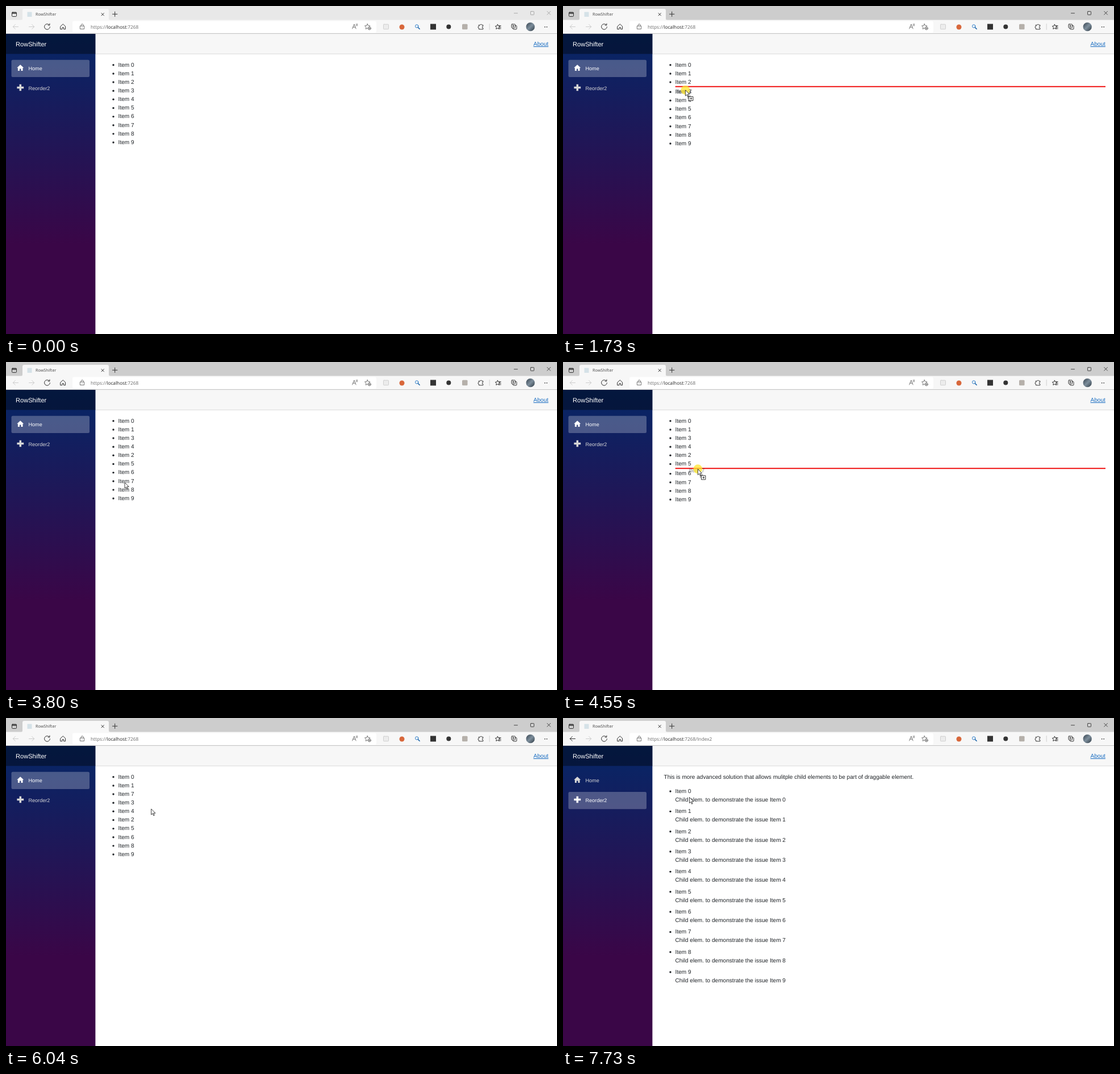
These frames come from a looping animation (970x577 px, 8 s). An HTML page:

```html
<!DOCTYPE html>
<html lang="en">
<head>
<meta charset="utf-8">
<title>RowShifter</title>
<style>
  html, body { margin: 0; width: 100%; height: 100%; overflow: hidden; background: #fff; }
  svg { display: block; width: 100vw; height: 100vh; text-rendering: geometricPrecision; }
  .page { font: 10.08px "Liberation Sans", Arial, sans-serif; fill: #212529; }
  .nav { font: 9.07px "Liberation Sans", Arial, sans-serif; fill: #d7d7d7; }
  .ui { font: 8.3px "Open Sans", "Noto Sans", sans-serif; fill: #6b6b6b; }
  .icon { fill: none; stroke: #333; stroke-linecap: round; stroke-linejoin: round; }
  .thin { stroke: #555; stroke-width: .8; }
</style>
</head>
<body>
<svg viewBox="0 0 970 577">
  <defs>
    <linearGradient id="side" x1="0" y1="0" x2="0" y2="1">
      <stop offset="0" stop-color="#052767"/><stop offset=".7" stop-color="#3a0647"/>
    </linearGradient>
    <linearGradient id="photo" x1="0" y1="0" x2="1" y2="1">
      <stop offset="0" stop-color="#36434e"/><stop offset=".5" stop-color="#7d8e9c"/><stop offset="1" stop-color="#2d3942"/>
    </linearGradient>
  </defs>
  <rect width="970" height="577" fill="#fff"/>

  <!-- browser frame -->
  <rect id="strip" width="970" height="25"/>
  <rect y="24.5" width="970" height="24" fill="#f7f7f7"/>
  <path d="M26 25q3 0 3-3V8q0-3 3-3H178q3 0 3 3V22q0 3 3 3z" fill="#f7f7f7"/>
  <rect x="117" y="26.5" width="535" height="20.5" rx="3" fill="#fff"/>
  <rect y="48" width="970" height="1" fill="#c4c4c4"/>
  <rect x="37.5" y="10.5" width="8" height="8.5" fill="#d5e2e8"/>
  <text class="ui" x="52" y="17.2" style="font-size:7.2px;fill:#444">RowShifter</text>
  <text class="ui" x="149" y="39.8">https://<tspan fill="#222">localhost</tspan>:7268<tspan id="path"></tspan></text>
  <g class="icon">
    <rect x="10.5" y="11" width="8" height="7.5" rx="1.2"/><path d="M11 12.4h7" stroke-width="2"/>
    <path d="M168 12.5l4.4 4.4m0-4.4l-4.4 4.4M187.5 14.3h8.4m-4.2-4.2v8.4"/>
    <path id="back" d="M21.5 36.5h-9.2m4-4l-4 4l4 4"/>
    <path d="M40.5 36.5h9.2m-4-4l4 4l-4 4" stroke="#cdcdcd"/>
    <path d="M76.2 33.2A4.9 4.9 0 1 0 77.4 36.7M76.9 31v2.8h-2.9"/>
    <path d="M96 35.8l4.3-4l4.3 4v5h-3v-3h-2.6v3h-3z"/>
    <path class="thin" d="M130.8 35h6.8v5.5h-6.8zm1.5 0v-1.4a1.9 1.9 0 0 1 3.8 0V35M134.2 37.5v.2"/>
    <path class="thin" d="M609.7 40l3.2-8l3.2 8m-5.2-2.8h4M616.4 32q1 1 0 2.4M618 31q1.5 2 0 4.2"/>
    <path class="thin" id="addStar"/>
    <circle class="thin" cx="639.8" cy="39.3" r="2.6" fill="#fff"/><path class="thin" d="M638.5 39.3h2.6m-1.3-1.3v2.6"/>
    <rect x="664.5" y="32.2" width="9" height="8.6" rx="1" fill="#ececec" stroke="#cfcfcf"/>
    <circle cx="723.2" cy="35.5" r="2.7" stroke="#2679c8"/><path d="M725.3 37.6l2.8 2.8" stroke="#2469ac" stroke-width="1.5"/>
    <path d="M832.5 33.5h2.2a1.6 1.6 0 0 1 3.1 0h2v2.2a1.5 1.5 0 0 0 0 3v2.2h-7.3v-2.2a1.5 1.5 0 0 1 0-3z"/>
    <path d="M851.2 31.5v10" stroke="#cfcfcf"/>
    <path id="listStar"/><path d="M868 34.7h3.2m-3.2 2.6h3.2m-3.2 2.5h3.2"/>
    <rect x="892.5" y="34.5" width="6.5" height="6.5" rx="1"/><rect x="890" y="32" width="6.5" height="6.5" rx="1" fill="#f7f7f7"/>
    <path d="M891.7 35.2h3m-1.5-1.5v3"/>
    <path d="M948.7 36.8h7" stroke-width="1.8" stroke-dasharray="0 3.5"/>
  </g>
  <circle cx="697" cy="37" r="4.5" fill="#d8673b"/>
  <rect x="747" y="31.5" width="10" height="10" fill="#333"/>
  <circle cx="779.3" cy="36.5" r="4" fill="#333"/>
  <rect x="803" y="31.7" width="9.5" height="9.5" rx="1.5" fill="#b5b0aa"/>
  <circle cx="923.2" cy="36.7" r="7.6" fill="url(#photo)"/>
  <g id="controls" class="icon" stroke-width=".8">
    <path d="M894.5 12.7h6M952.7 9.4l5.8 5.8m0-5.8l-5.8 5.8"/><rect x="923.5" y="9.5" width="6" height="6" rx=".8"/>
  </g>

  <!-- site frame -->
  <rect x="157" y="49" width="813" height="35" fill="#f7f7f7"/>
  <rect x="157" y="83.8" width="813" height=".8" fill="#d0d0d0"/>
  <text class="page" x="928.5" y="70" style="fill:#1b6ec2" text-decoration="underline">About</text>
  <rect y="49" width="157.4" height="528" fill="url(#side)"/>
  <rect y="49" width="157.4" height="35.3" fill="#000" fill-opacity=".4"/>
  <text class="nav" x="17" y="70.6" style="font-size:11.1px;fill:#fff">RowShifter</text>
  <rect id="homeBox" x="9.5" y="94.7" width="137.5" height="30.3" rx="2.5" fill="#fff"/>
  <rect id="orderBox" x="9.5" y="130" width="137.5" height="30.3" rx="2.5" fill="#fff"/>
  <g id="homeNav" class="nav"><path d="M25.2 103.2l-6 5.6h1.7v5.2h3v-3.4h2.6v3.4h3v-5.2h1.7z"/><text x="39.5" y="112.9">Home</text></g>
  <g id="orderNav" class="nav"><path d="M19.4 143.5h11.8m-5.9-5.8v11.6" stroke-width="3.5"/><text x="39.5" y="148.2">Reorder2</text></g>

  <!-- content -->
  <g id="simple" class="page"></g>
  <g id="nested" class="page"></g>
  <rect id="marker" x="197.7" width="757.3" height="2" fill="#f01414"/>
  <g id="status">
    <path d="M0 562.5H101q3 0 3 3V577H0z" fill="#f7f7f7" stroke="#c8c8c8" stroke-width=".6"/>
    <text class="ui" x="4" y="572.5" style="font-size:7px">https://localhost:7268/Index2</text>
  </g>
  <text id="ghost" class="page" opacity=".5"></text>
  <g id="pointer">
    <circle id="halo" r="8" fill="#ffe62e"/>
    <path id="arrow" d="M0 0V10.2L2.4 8L4.1 11.8L5.7 11.1L4 7.4H7.3z" fill="#fff" stroke="#111" stroke-width=".8" stroke-linejoin="round"/>
    <path id="hand" d="M-1.3 6.8V.4q1-1.4 2 0V4.4l3.1.7q1.4.5 1.3 2l-.7 5.6H-.7L-3.6 8.4q.4-1.9 2.3 0z" fill="#fff" stroke="#333" stroke-width=".6" stroke-linejoin="round"/>
    <g id="copy" class="icon"><rect x="6.5" y="11.5" width="7" height="7" fill="#fff"/><path d="M8.5 15h3m-1.5-1.5v3"/><path d="M4.5 14.5v-4.2h4.2" stroke-dasharray="1 1.4"/></g>
  </g>
</svg>
<script>
  const LOOP = 8000, ROW = 15.13, TOP = 95.6, LEFT = 197.6, BASE = 106.7;
  const FOCUS = 1270, CLICK = 7040;
  const $ = Object.fromEntries([...document.querySelectorAll('[id]')].map(e => [e.id, e]));

  const easeOut = p => 1 - (1 - p) ** 1.5;
  const rush = p => 1 - (1 - p) ** 2.4;
  const linger = p => p ** 1.66;

  // pointer strokes; x and y may ease differently, which bends the stroke
  const home = { x: 844, y: 495 };
  const strokes = [
    { from: 190, to: 930, x: 217, y: 129, easeX: rush, easeY: rush },
    { from: 1000, to: 1070, x: 214, y: 130 },
    { from: 1460, to: 2220, x: 217, y: 167 },
    { from: 2220, to: 2420, x: 213, y: 175.5 },
    { from: 2880, to: 3200, x: 214, y: 143 },
    { from: 3200, to: 3670, x: 196, y: 218 },
    { from: 3740, to: 3800, x: 209, y: 212 },
    { from: 4070, to: 5080, x: 245, y: 131, easeX: rush, easeY: linger },
    { from: 5480, to: 5900, x: 256.5, y: 160 },
    { from: 6040, to: 6370, x: 72, y: 145 },
    { from: 7250, to: 7730, x: 222.5, y: 139.5 }
  ];
  const grabs = [
    { item: 2, press: FOCUS, lift: 1460, drop: 2270, slot: 4 },
    { item: 5, press: 2880, lift: 2930, drop: 3350, slot: 5 },
    { item: 7, press: 4070, lift: 4130, drop: 5480, slot: 2 }
  ];
  const items = [...Array(10).keys()];

  const within = (t, from, to) => t >= from && t < to;
  const show = (el, on) => { el.style.display = on ? '' : 'none'; };
  const place = (el, x, y) => el.setAttribute('transform', `translate(${x} ${y})`);
  const progress = (t, from, to) => Math.min(1, Math.max(0, (t - from) / (to - from)));
  const mix = (a, b, p) => a + (b - a) * p;
  const label = (x, y, text) => `<text x="${x}" y="${y}">${text}</text>`;
  const bullet = y => `<circle cx="189" cy="${y - 2.9}" r="1.7"/>`;

  function starPath(cx, cy, r) {
    const points = items.map(i => {
      const a = i * Math.PI / 5, d = i % 2 ? r / 2 : r;
      return `${cx + d * Math.sin(a)} ${cy - d * Math.cos(a)}`;
    });
    return `M${points.join('L')}z`;
  }

  function pointerAt(t) {
    return strokes.filter(s => s.from <= t).reduce((at, s) => {
      const p = progress(t, s.from, s.to);
      return {
        x: mix(at.x, s.x, (s.easeX || easeOut)(p)),
        y: mix(at.y, s.y, (s.easeY || easeOut)(p))
      };
    }, home);
  }

  function orderAt(t) {
    const order = [...items];
    for (const g of grabs.filter(g => g.drop <= t)) {
      order.splice(order.indexOf(g.item), 1);
      order.splice(g.slot, 0, g.item);
    }
    return order;
  }

  $.addStar.setAttribute('d', starPath(636.3, 36.5, 5));
  $.listStar.setAttribute('d', starPath(865.5, 36.8, 4.5));
  $.simple.innerHTML = items.map(() => `<g>${bullet(BASE)}${label(LEFT, BASE, '')}</g>`).join('');
  $.nested.innerHTML =
    label(177.5, BASE, 'This is more advanced solution that allows mulitple child elements to be part of draggable element.') +
    items.map(n => {
      const y = 131.9 + 35.34 * n;
      return bullet(y) + label(LEFT, y, 'Item ' + n) +
        label(LEFT, y + ROW, 'Child elem. to demonstrate the issue Item ' + n);
    }).join('');

  function drawList(t, x, y) {
    const drag = grabs.find(g => within(t, g.lift, g.drop));
    const slot = drag ? Math.floor((y - TOP) / ROW) : items.length;
    const order = orderAt(t);
    [...$.simple.children].forEach((row, i) => {
      place(row, 0, i * ROW + (i >= slot ? 2 : 0));
      row.lastChild.textContent = 'Item ' + order[i];
    });
    for (const el of [$.marker, $.ghost, $.copy]) show(el, drag);
    if (!drag) return;
    $.marker.setAttribute('y', TOP + slot * ROW - .2);
    $.ghost.textContent = 'Item ' + drag.item;
    place($.ghost, x - 16, y + 5.2);
  }

  function draw(t) {
    const { x, y } = pointerAt(t);
    const second = t >= CLICK;
    const hover = t > 6040 && x < 147;
    const held = grabs.find(g => within(t, g.press, g.drop));
    const switched = progress(t, CLICK + 70, CLICK + 280);

    drawList(t, x, y);
    show($.simple, !second);
    show($.nested, second);

    show($.pointer, t >= 190);
    place($.pointer, x, y);
    show($.hand, hover);
    show($.arrow, !hover);
    show($.halo, held || within(t, CLICK, CLICK + 100));
    $.halo.style.opacity = held ? mix(.55, .75, progress(t, held.press, held.press + 150)) : .7;

    show($.status, within(t, 6510, CLICK + 60));
    $.status.style.opacity = progress(t, 6400, 6650);

    $.homeBox.style.opacity = mix(.25, 0, switched ** 2);
    $.orderBox.style.opacity = second ? mix(.1, .25, switched ** 2) : hover ? .1 : 0;
    $.homeNav.style.fill = switched < 1 ? '#fff' : '#d7d7d7';
    $.orderNav.style.fill = $.orderNav.style.stroke = '';
    $.orderNav.style.fill = second || hover ? '#fff' : '#d7d7d7';
    $.orderNav.firstChild.style.stroke = $.orderNav.style.fill;
    $.path.textContent = second ? '/Index2' : '';
    $.back.style.stroke = second ? '#333' : '#cdcdcd';
    $.strip.style.fill = t < FOCUS ? '#e8e8e8' : '#cdcdcd';
    $.controls.style.stroke = t < FOCUS ? '#999' : '#222';
  }

  const start = performance.now();
  (function tick() {
    draw((performance.now() - start) % LOOP);
    requestAnimationFrame(tick);
  })();
</script>
</body>
</html>
```
